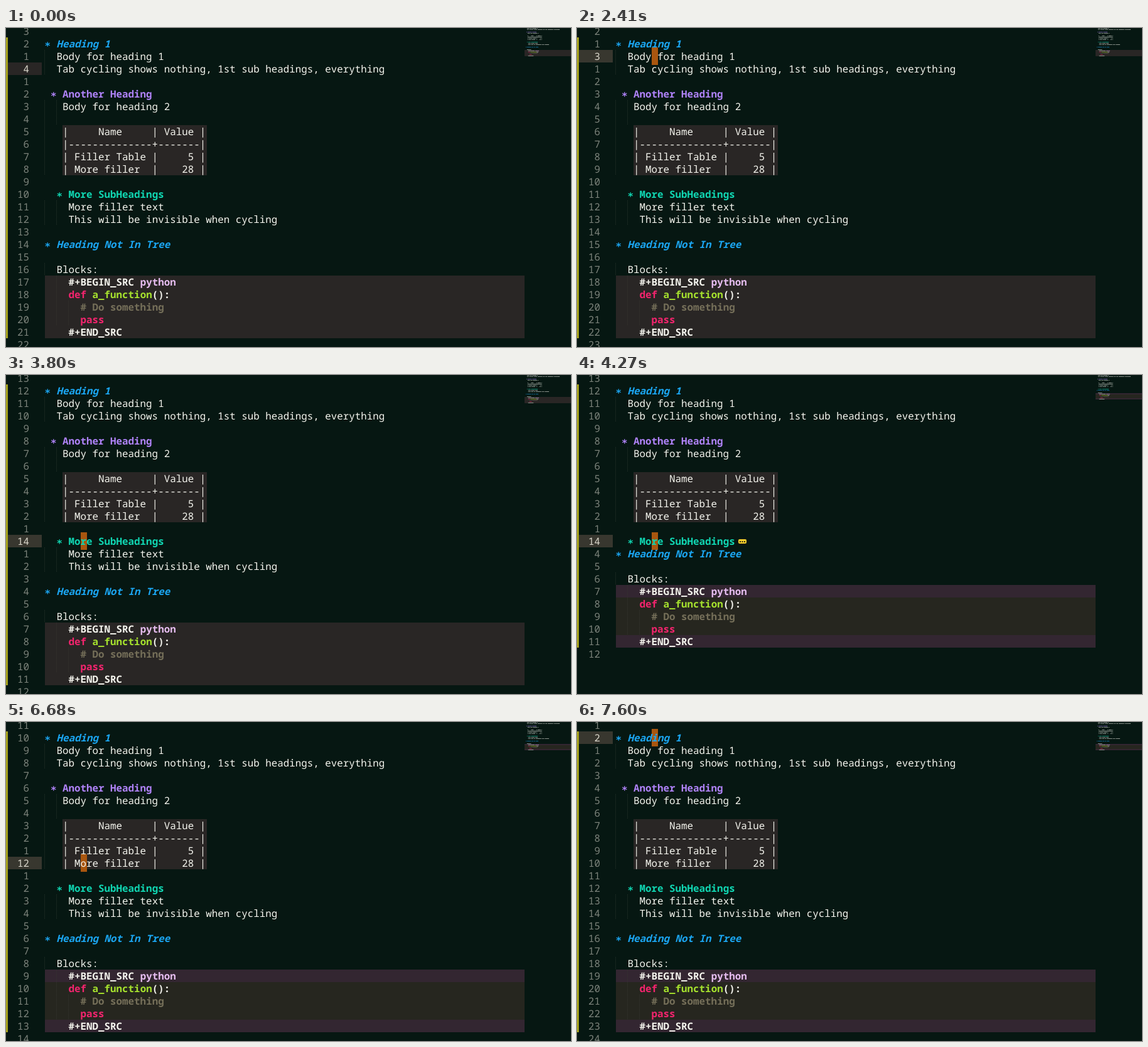
These frames come from a looping animation (900 by 509 pixels, 8000 ms). An HTML page with a canvas:

```html
<!DOCTYPE html>
<html lang="en">
<head>
<meta charset="utf-8">
<title>Outline editing</title>
<style>
  html, body { margin: 0; width: 100%; height: 100%; overflow: hidden; background: #061712; }
  canvas { display: block; }
</style>
</head>
<body>
<canvas id="stage" width="900" height="509"></canvas>
<script>
const ctx = document.getElementById('stage').getContext('2d');
const LOOP = 8000;
const ROW = 20, LEFT = 62, CELL = 9.51, SIZE = CELL / 0.6;
const FONT = `${SIZE}px "Noto Sans Mono", "DejaVu Sans Mono", monospace`;
const STAR_FONT = `${SIZE}px "DejaVu Sans Mono", monospace`;
const C = {
  bg: '#061712', text: '#f5f5ee', gutter: '#7c837b', bar: '#a5a11c', panel: '#292625',
  active: '#38372f', activeNum: '#d9d6ca', caret: '#a9560f', guide: '#26332b',
  blue: '#1ba6f2', violet: '#b083fa', teal: '#10d6b2', pink: '#f4246e',
  green: '#a6e22e', lilac: '#e6bdf0', comment: '#756f59',
  fence: '#332631', code: '#26261f', fold: '#f5cd2c'
};

// line number -> list of [column, text, colour, style]
const heading = (col, text, color, style) =>
  [[col, '*', color, style], [col + 2, text, color, style]];
const plain = (col, text) => [[col, text, C.text, '']];
const DOC = {
  2: heading(0, 'Heading 1', C.blue, 'italic bold'),
  3: plain(2, 'Body for heading 1'),
  4: plain(2, 'Tab cycling shows nothing, 1st sub headings, everything'),
  6: heading(1, 'Another Heading', C.violet, 'bold'),
  7: plain(3, 'Body for heading 2'),
  9: plain(3, '|     Name     | Value |'),
  10: plain(3, '|--------------+-------|'),
  11: plain(3, '| Filler Table |     5 |'),
  12: plain(3, '| More filler  |    28 |'),
  14: heading(2, 'More SubHeadings', C.teal, 'bold'),
  15: plain(4, 'More filler text'),
  16: plain(4, 'This will be invisible when cycling'),
  18: heading(0, 'Heading Not In Tree', C.blue, 'italic bold'),
  20: plain(2, 'Blocks:'),
  21: [[4, '#+BEGIN_SRC', C.text, 'bold'], [16, 'python', C.lilac, 'bold']],
  22: [[4, 'def', C.pink, 'bold'], [8, 'a_function', C.green, 'bold'], [18, '():', C.text, 'bold']],
  23: [[6, '# Do something', C.comment, 'bold']],
  24: [[6, 'pass', C.pink, 'bold']],
  25: [[4, '#+END_SRC', C.text, 'bold']]
};
const LAST = 26;

// indent guides: [column, first line, last line]
const GUIDES = [[0, 3, 4], [0, 7, 12], [2, 7, 8], [0, 15, 16], [2, 15, 16],
  [0, 20, 20], [2, 21, 24], [4, 23, 24]];

// [time, caret line]
const MOVES = [[0, 4], [606, 3], [2090, 2], [2410, 3], [2640, 4], [2790, 5], [2940, 6],
  [3110, 7], [3630, 8], [3710, 11], [3800, 14], [6210, 13], [6680, 12], [6760, 9],
  [6840, 6], [7140, 5], [7310, 4], [7450, 3], [7600, 2]];
const FOCUS = 606, FOLD = 4270, UNFOLD = 5830;

// pointer path: [time, x, y]
const PATH = [[150, 543, 242], [225, 290, 90], [300, 100, 10], [450, 110, 32],
  [528, 122, 44], [762, 122, 44], [840, 180, 72], [1070, 560, 235], [1230, 740, 297], [1310, 755, 305]];
const POINTER_END = 2090;

const rect = (x, y, w, h, color) => {
  ctx.fillStyle = color;
  ctx.fillRect(x, y, w, h);
};

function write(text, x, y, color, style = '') {
  const star = text === '*';
  ctx.font = `${style} ${star ? STAR_FONT : FONT}`;
  ctx.fillStyle = color;
  ctx.fillText(text, x, y + (star ? 3 : 0));
}

function caretLine(t) {
  let line = MOVES[0][1];
  for (const [at, to] of MOVES) if (t >= at) line = to;
  return line;
}

function pointerAt(t) {
  // the pointer is redrawn in ticks
  if (t < 450) t = t < 225 ? 150 : t < 300 ? 225 : 300;
  else if (t < 1310) t = 450 + Math.floor((t - 450) / 78) * 78;
  else t = 1310;
  let i = 0;
  while (i < PATH.length - 2 && t >= PATH[i + 1][0]) i++;
  const [t0, x0, y0] = PATH[i], [t1, x1, y1] = PATH[i + 1];
  const k = Math.min(1, (t - t0) / (t1 - t0));
  return [Math.round(x0 + (x1 - x0) * k), Math.round(y0 + (y1 - y0) * k)];
}

function drawPointer(x, y) {
  const beam = (grow, color) => {
    rect(x - grow, y - 7 - grow, 1 + 2 * grow, 15 + 2 * grow, color);
    for (const dy of [-7, 7]) rect(x - 3 - grow, y + dy - grow, 7 + 2 * grow, 1 + 2 * grow, color);
  };
  beam(1, '#020806');
  beam(0, '#eeeeee');
}

function drawFoldMark(y) {
  ctx.fillStyle = C.fold;
  ctx.beginPath();
  ctx.roundRect(257, y - 3, 13, 7, 2);
  ctx.fill();
  for (let i = 0; i < 3; i++) rect(259 + i * 3.5, y, 2, 2, '#2a2a10');
}

function drawMinimap(lines, blockColor) {
  lines.forEach((n, i) => {
    const y = 2 * i - 5;
    if (n > 20 && n < 26) rect(826, y, 74, 2, blockColor(n));
  });
  ctx.globalAlpha = 0.7;
  lines.forEach((n, i) => {
    for (const [col, text, color] of DOC[n] || []) {
      [...text].forEach((ch, k) => {
        if (ch !== ' ') rect(828 + (col + k) * 0.95, 2 * i - 4, 0.8, 1, color);
      });
    }
  });
  ctx.globalAlpha = 1;
}

function draw(t) {
  const cur = caretLine(t), focused = t >= FOCUS;
  const folded = t >= FOLD && t < UNFOLD;
  const blockColor = n => t < FOLD ? C.panel : n === 21 || n === 25 ? C.fence : C.code;
  const lines = [];
  for (let n = 1; n <= LAST; n++) if (!folded || n < 15 || n > 17) lines.push(n);
  const mid = n => 5 + ROW * lines.indexOf(n);

  rect(0, 0, 900, 509, C.bg);
  rect(0, 15, 3, mid(25) + 10 - 15, C.bar);
  rect(3, mid(cur) - 10, 54, ROW, focused ? C.active : C.panel);
  rect(90, mid(9) - 10, 230, 4 * ROW, C.panel);
  for (let n = 21; n < 26; n++) rect(LEFT, mid(n) - 10, 764, ROW, blockColor(n));

  for (const [col, from, to] of GUIDES) {
    if (folded && from === 15) continue;
    const x = Math.round(LEFT + col * CELL) - 1, end = mid(to) + 10;
    const color = from > 20 ? '#35342f' : C.guide;
    for (let y = mid(from) - 10; y < end; y += 2) rect(x, y, 1, 1, color);
  }

  if (focused) {
    const x = DOC[cur] ? 119 : LEFT;
    rect(x, mid(cur) - 14, 10, 28, C.caret);
  }

  for (const n of lines) {
    const base = mid(n) + 6;
    const num = String(n === cur ? n : Math.abs(n - cur));
    write(num, 37 - num.length * CELL, base, n === cur ? C.activeNum : C.gutter);
    for (const [col, text, color, style] of DOC[n] || []) {
      write(text, LEFT - 0.5 + col * CELL, base, color, style);
    }
  }
  if (folded) drawFoldMark(mid(14));
  drawMinimap(lines, blockColor);
  if (t >= PATH[0][0] && t < POINTER_END) drawPointer(...pointerAt(t));
}

ctx.textRendering = 'geometricPrecision';
ctx.textBaseline = 'alphabetic';
const start = performance.now();
function tick() {
  draw((performance.now() - start) % LOOP);
  requestAnimationFrame(tick);
}
tick();
</script>
</body>
</html>
```
